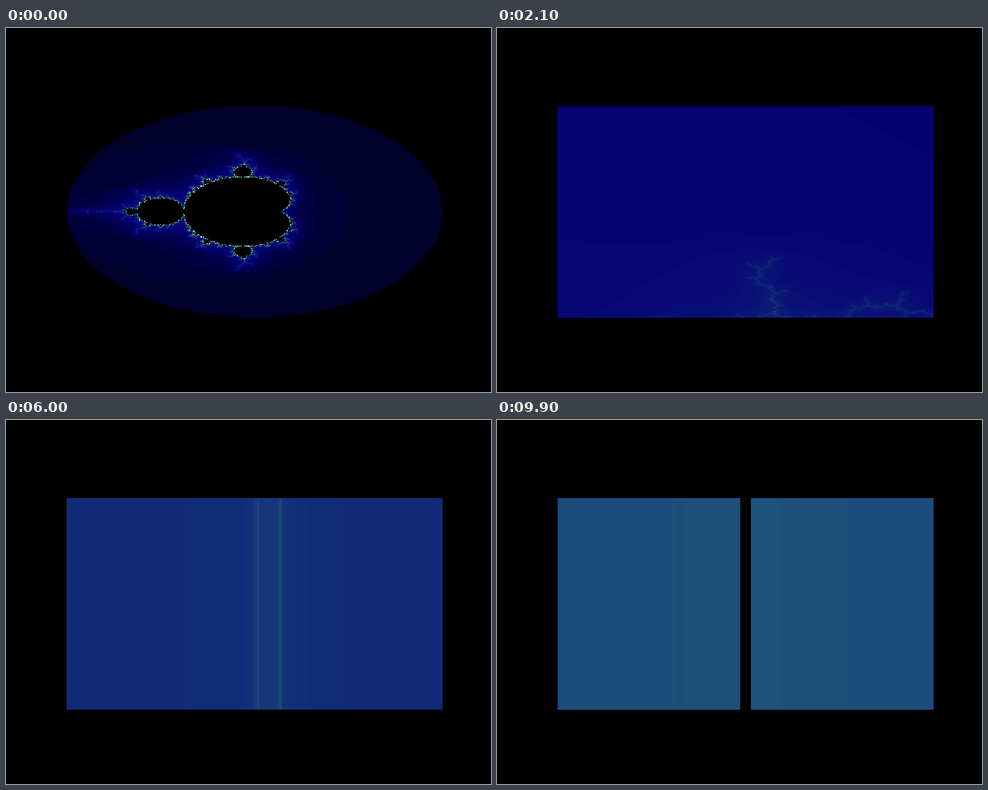
Write an HTML page with a canvas that moves like this. It is 640x480 px and loops after 10 s.

```html
<!DOCTYPE html>
<html lang="en">
<head>
<meta charset="utf-8">
<title>Mandelbrot zoom</title>
<style>
  html, body { margin: 0; height: 100%; overflow: hidden; background: #000; }
  canvas { display: block; }
</style>
</head>
<body>
<canvas width="640" height="480"></canvas>
<script>
const ctx = document.querySelector('canvas').getContext('2d');

// Plot area on the stage, and the finer sampling grid behind it.
const LEFT = 80, TOP = 103, WIDTH = 496, HEIGHT = 279;
const GRID_W = 1920, GRID_H = 1080;
const FRAMES = 100, FRAME_MS = 100, ZOOM = 0.7, MAX_ITER = 1000;

// Colour by escape count, blended between a few keys.
const KEYS = [[0, 0x000000], [1, 0x00002b], [7, 0x04006e], [8, 0x050274], [42, 0x1b4d7a],
  [72, 0x308080], [117, 0x459a46], [178, 0xb7b75e], [255, 0xfdfbfb]];

function colour(count) {
  const next = Math.max(1, KEYS.findIndex(([key]) => key >= count));
  const [k0, c0] = KEYS[next - 1], [k1, c1] = KEYS[next];
  const mix = shift => {
    const a = c0 >> shift & 255, b = c1 >> shift & 255;
    return Math.round(a + (b - a) * (count - k0) / (k1 - k0));
  };
  return (255 << 24 | mix(0) << 16 | mix(8) << 8 | mix(16)) >>> 0;
}
const palette = Uint32Array.from({ length: 256 }, (_, count) => colour(count));

// Nearest grid sample for each pixel, as a coordinate in [-2, 2].
const samples = (pixels, grid) => Array.from({ length: pixels }, (_, i) =>
  -2 + 4 * Math.floor((i + .5) * grid / pixels) / (grid - 1));
const columns = samples(WIDTH, GRID_W);
// The plot is one pixel taller than its clip box, which hides the top row.
const rows = samples(HEIGHT + 1, GRID_H).slice(1);

function escapeCount(cx, cy) {
  let x = cx, y = cy;
  for (let n = 0; n < MAX_ITER; n++) {
    const xx = x * x, yy = y * y;
    if (xx + yy > 4) return Math.min(n, 255);
    y = 2 * x * y + cy;
    x = xx - yy + cx;
  }
  return 0;
}

const image = ctx.createImageData(WIDTH, HEIGHT);
const pixels = new Uint32Array(image.data.buffer);

// Zoom towards c = i. Rows are held in single precision, so they merge into bands.
function draw(frame) {
  const scale = ZOOM ** frame;
  let lastY;
  rows.forEach((row, j) => {
    const y = Math.fround(1 + (row - 1) * scale);
    const start = j * WIDTH;
    if (y === lastY) {
      pixels.copyWithin(start, start - WIDTH, start);
    } else {
      for (let i = 0; i < WIDTH; i++) {
        pixels[start + i] = palette[escapeCount(columns[i] * scale, y)];
      }
    }
    lastY = y;
  });
  ctx.putImageData(image, LEFT, TOP);
}

let shown = -1;
function tick() {
  const frame = Math.floor(performance.now() / FRAME_MS) % FRAMES;
  if (frame !== shown) draw(shown = frame);
  requestAnimationFrame(tick);
}
tick();
</script>
</body>
</html>
```
